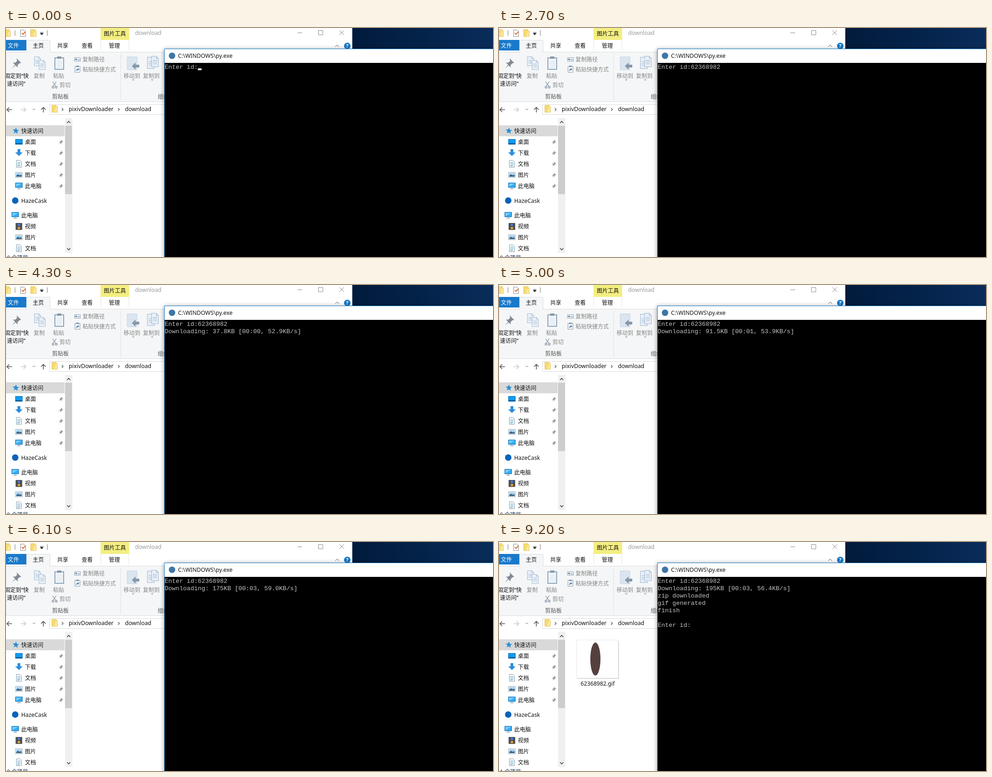
An HTML page for the animation above (9.3 s loop, 1056 px wide and 499 px high).

```html
<!DOCTYPE html>
<html lang="zh-CN">
<head>
<meta charset="utf-8">
<title>Downloader</title>
<style>
  html, body { margin: 0; width: 100%; height: 100%; overflow: hidden; background: #fff; }
  svg { display: block; width: 1056px; height: 499px; }
  text { font: 12px "Noto Sans", "Noto Sans CJK SC", "Noto Sans CJK JP", sans-serif; fill: #111; }
  .latin { font-size: 12.3px; }
  .dim text { fill: #858585; }
  #lines text { font: 13.333px "Liberation Mono", monospace; fill: #c4c4c4; white-space: pre; }
  .line { fill: none; stroke: #555; }
  .window { filter: drop-shadow(0 1px 5px rgba(0, 0, 0, .4)); }
</style>
</head>
<body>
<svg viewBox="0 0 1056 499">
  <defs>
    <linearGradient id="sky">
      <stop offset="0" stop-color="#021b3c"/>
      <stop offset=".5" stop-color="#04234a"/>
      <stop offset="1" stop-color="#0a2c5a"/>
    </linearGradient>
    <g id="folder"><path d="M0 1h10v3h3v13H0z" fill="#f6da72"/><path d="M10 4h3v13h-8z" fill="#fbe9a2"/><path d="M.5 1.5h9.500v3h2.500v12H.5z" fill="none" stroke="#e5c456"/></g>
    <path id="pin" d="M5 0l5 5-2 .5-2 2 .2 2.500-2.400-2.300L0 11l3.300-4L1 4.600l2.600.2 2-2z"/>
    <path id="chevron" d="M-2-3l3 3-3 3" fill="none" stroke="#555" stroke-width="1.300"/>
    <path id="arrow" d="M12 0H1M6-5L1 0l5 5" fill="none" stroke-width="1.600"/>
    <g id="page"><path d="M.5.5h9l4 4v15H.5z" fill="#e9f0f8" stroke="#a9bdd2"/><path d="M9.500.5v4h4M3 8h8M3 11h8M3 14h8" fill="none" stroke="#a9bdd2"/></g>
    <g id="monitor"><path d="M.5 1.500h15v10H.5z" fill="#35aaf0" stroke="#1b78b4"/><path d="M2 3h12L2 10z" fill="#7accfa"/><path d="M4 14.500h8M8 12v2" stroke="#71889a"/></g>
    <g id="doc"><path d="M2.500.5h8l3 3v12h-11z" fill="#fff" stroke="#8796a3"/><path d="M4.500 5h7M4.500 8h7M4.500 11h7M4.500 13h5" stroke="#3b9bc4"/></g>
    <g id="photo"><path d="M.5 2.500h15v11H.5z" fill="#fff" stroke="#9aa4ac"/><path d="M2 4h12v8H2z" fill="#9fd1f3"/><path d="M2 10l4-3 3 2 5-1v4H2z" fill="#356487"/></g>
  </defs>

  <rect width="1056" height="499" fill="#fff"/>
  <rect x="751" width="305" height="46" fill="url(#sky)"/>
  <path d="M750.500 0v45" stroke="#d5dce2"/>

  <!-- title bar -->
  <use href="#folder" x="-3" y="2"/>
  <path d="M19.500 5v12M89.500 5v12" stroke="#777"/>
  <path d="M31.500 4.500h8l3 3v11h-11z" fill="#fff" stroke="#888"/>
  <path d="M34 11l3 3 5-6" fill="none" stroke="#e0713a" stroke-width="2"/>
  <use href="#folder" x="53" y="2"/>
  <path d="M74 9.500h7M74 11.500h7l-3.500 3.500z" fill="#111" stroke="#111" stroke-width=".7"/>
  <rect x="205" width="62" height="26" fill="#f3ee80"/>
  <path d="M205.500 26v22M266.500 26v22" stroke="#e3e3e3"/>
  <text x="212" y="17">图片工具</text>
  <text class="latin" x="280" y="15" style="fill:#999">download</text>
  <path class="line" d="M632 10.500h10M677.500 5.500h9.500v9.500h-9.500zM723 5l10 10M733 5l-10 10" style="stroke:#888"/>
  <path class="line" d="M714 41l4-4 4 4"/>
  <circle cx="740" cy="39" r="7" fill="#1377c8"/>
  <text x="737.300" y="43" style="fill:#fff;font-size:11px;font-weight:bold">?</text>

  <!-- ribbon -->
  <path d="M0 52.500h344v108H0z" fill="#f5f6f7" stroke="#dadbdc"/>
  <rect y="26" width="44" height="23" fill="#1979ca"/>
  <path d="M44.500 53V26.500h51V53" fill="#f5f6f7" stroke="#dadbdc"/>
  <text x="4" y="42.500" style="fill:#fff">文件</text>
  <text x="58" y="42.500">主页</text>
  <text x="111" y="42.500">共享</text>
  <text x="164" y="42.500">查看</text>
  <text x="223" y="42.500">管理</text>
  <path d="M248.500 56v101" stroke="#e0e1e2"/>
  <use href="#pin" transform="translate(13 66) scale(2)" fill="#818b94"/>
  <use href="#page" transform="translate(61 62) scale(1.050)"/>
  <use href="#page" transform="translate(71 70) scale(1.050)"/>
  <path d="M106 65h19v25h-19z" fill="#f1f5f9" stroke="#8ba3b9" stroke-width="2"/>
  <path d="M111 62h9v5h-9z" fill="#8d99a5"/>
  <path d="M109 73h13M109 77h13M109 81h13M109 85h13" stroke="#d4dde6"/>
  <g class="line" style="stroke:#7d8fa1" stroke-width="1.300"><path d="M101 117l7 10M109 117l-7 10"/><circle cx="102" cy="129" r="2"/><circle cx="109" cy="129" r="2"/></g>
  <path d="M148.500 64.500h13v8h-13z" fill="#e6edf4" stroke="#9aabba"/>
  <path d="M150 67l1 3 1-3 1 3 1-3M156 69.500h4" class="line" style="stroke:#667f95"/>
  <path d="M149.500 83.500h11v13h-11z" fill="#f5f8fb" stroke="#8299ad"/>
  <path d="M152 82h6v3h-6z" fill="#8299ad"/>
  <path d="M152 94c0-4 2-5 4-5v-2l3 3-3 3v-2" fill="#5c84ab"/>
  <path d="M263 63h21v28h-21z" fill="#dae5f0" stroke="#c1d1e1"/>
  <path d="M289 80h-8v-5l-8 8 8 8v-5h8z" fill="#8798aa"/>
  <use href="#page" transform="translate(306 63) scale(1.150 1.300)"/>
  <use href="#page" transform="translate(315 61) scale(1.150 1.200)"/>
  <path d="M273 112h6l-3 3zM314 112h6l-3 3z" fill="#aaa"/>
  <text x="-3" y="108.500">固定到“快</text>
  <text x="2" y="125.500">速访问”</text>
  <g class="dim">
    <text x="60" y="108.500">复制</text>
    <text x="102" y="108.500">粘贴</text>
    <text x="116" y="128.500">剪切</text>
    <text x="166" y="72.500">复制路径</text>
    <text x="166" y="94.500">粘贴快捷方式</text>
    <text x="255" y="108.500">移动到</text>
    <text x="297" y="108.500">复制到</text>
  </g>
  <text x="100" y="153.500" style="fill:#555">剪贴板</text>
  <text x="329" y="153.500" style="fill:#555">组织</text>

  <!-- address bar -->
  <use href="#arrow" x="1" y="178" stroke="#555"/>
  <use href="#arrow" transform="translate(44 178) scale(-1 1)" stroke="#ccc"/>
  <path class="line" d="M58 176l2.500 2.500 2.500-2.500"/>
  <use href="#arrow" transform="translate(81 184) rotate(90) translate(-12 0)" stroke="#555"/>
  <path d="M350 166.500H94.500v22H350" fill="#fff" stroke="#d9d9d9"/>
  <use href="#folder" x="99" y="167"/>
  <use href="#chevron" x="123" y="177.500"/>
  <use href="#chevron" x="245" y="177.500"/>
  <text class="latin" x="136" y="181">pixivDownloader</text>
  <text class="latin" x="258" y="181">download</text>

  <!-- navigation pane -->
  <rect x="128" y="196" width="16" height="294" fill="#f0f0f0"/>
  <rect x="128" y="213" width="15" height="149" fill="#cdcdcd"/>
  <path d="M132.500 207l3.500-3.500 3.500 3.500M132.500 480l3.500 3.500 3.500-3.500" fill="none" stroke="#444" stroke-width="1.600"/>
  <rect y="212" width="127" height="24" fill="#d9d9d9"/>
  <path d="M22 217l1.500 5 5 .5-4 3 1 5-4.500-3-4.500 2 2-4.500-4-3.500 5-.5z" fill="#2a8fd6"/>
  <path d="M20.500 242.500h15v11h-15z" fill="#129af0" stroke="#0c70b4"/>
  <path d="M21 252h14" stroke="#0b5b94" stroke-width="2"/>
  <path d="M25 264h6v7h5l-8 8-8-8h5z" fill="#2c8ddd"/>
  <use href="#doc" x="20" y="288"/>
  <use href="#photo" x="20" y="312"/>
  <use href="#monitor" x="20" y="336"/>
  <circle cx="20" cy="376" r="7" fill="#0b63b8"/>
  <use href="#monitor" x="12" y="400"/>
  <path d="M21 425h14v15H21z" fill="#222"/>
  <path d="M25 426h6v6h-6z" fill="#4b78c9"/><path d="M25 433h6v6h-6z" fill="#c39a4e"/>
  <path d="M23 426v14M33 426v14" stroke="#ddd" stroke-width="1.500" stroke-dasharray="1.500"/>
  <use href="#photo" x="20" y="448"/>
  <use href="#doc" x="20" y="472"/>
  <g fill="#8d989f">
    <use href="#pin" x="114" y="243"/><use href="#pin" x="114" y="267"/><use href="#pin" x="114" y="291"/>
    <use href="#pin" x="114" y="315"/><use href="#pin" x="114" y="339"/>
  </g>
  <text x="33" y="228.500">快速访问</text>
  <text x="41" y="252.500">桌面</text>
  <text x="41" y="276.500">下载</text>
  <text x="41" y="300.500">文档</text>
  <text x="41" y="324.500">图片</text>
  <text x="41" y="348.500">此电脑</text>
  <text class="latin" x="33" y="380.500">HazeCask</text>
  <text x="33" y="412.500">此电脑</text>
  <text x="41" y="436.500">视频</text>
  <text x="41" y="460.500">图片</text>
  <text x="41" y="484.500">文档</text>
  <text id="status" x="2" y="504.500" style="fill:#1e395b"></text>

  <!-- downloaded file -->
  <g id="file">
    <g id="icon">
      <path d="M183.500 210.500h44l18 18v65h-62z" fill="#f7f7f7" stroke="#d8d8d8"/>
      <path d="M227.500 210.500v18h18z" fill="#e3e3e3" stroke="#d0d0d0"/>
      <path d="M191 231h46v48h-46z" fill="#0078d7"/>
      <path d="M194 237h40v39h-40z" fill="#fff"/>
      <path d="M194 261l15-18 17 22 3-4-5-6 3-4 7 8v17h-40z" fill="#0078d7"/>
    </g>
    <g id="thumb">
      <path d="M170 216h90v82h-90z" fill="#ccc"/>
      <path d="M168.500 213.500h90v83h-90z" fill="#fff" stroke="#e6e6e6"/>
      <ellipse cx="209" cy="255" rx="11" ry="36" fill="#54403f"/>
    </g>
    <text x="177" y="313" style="font-size:12.200px">62368982.gif</text>
  </g>

  <!-- console -->
  <path class="window" d="M343.500 510V45.500H1070V510" fill="#fff" stroke="#1a7fc9"/>
  <rect x="344" y="76" width="712" height="423" fill="#000"/>
  <circle cx="360" cy="60.500" r="7" fill="#3d76a8"/>
  <text class="latin" x="373" y="65">C:\WINDOWS\py.exe</text>
  <g id="lines"></g>
  <rect id="cursor" width="8" height="4" fill="#fff"/>
</svg>
<script>
const LOOP = 9300, LEFT = 344, TOP = 76, ROW = 16, COL = 8;
const $ = id => document.getElementById(id);
const show = (id, on) => $(id).style.display = on ? '' : 'none';

// start, end, column, row of each visible cursor blink
const blinks = [
  [0, 200, 9, 0], [600, 900, 9, 0],
  [1600, 2000, 17, 0], [2400, 2700, 17, 0], [3100, 3500, 17, 0],
  [7000, 7400, 0, 3], [8100, 8500, 9, 6], [8800, 9200, 9, 6]
];

// time, kilobytes, elapsed seconds, rate
const progress = [
  [3800, 0, 0, 52], [4300, 37.8, .72, 52.9], [5000, 91.5, 1.7, 53.9],
  [6100, 175, 3.05, 59], [6400, 195, 3.48, 56.4]
];

const lines = Array.from({ length: 7 }, (_, row) => {
  const line = document.createElementNS('http://www.w3.org/2000/svg', 'text');
  line.setAttribute('x', LEFT);
  line.setAttribute('y', TOP + row * ROW + 13);
  return $('lines').appendChild(line);
});

function size(kb) {
  return kb.toFixed(kb < 9.995 ? 2 : kb < 99.95 ? 1 : 0) + 'KB';
}

function download(t) {
  if (t < 3800) return '';
  if (t < 3900) return 'Downloading: 0.00B [00:00, ?B/s]';
  const now = Math.min(Math.floor(t / 100) * 100, 6400);
  const next = progress.findIndex(p => p[0] >= now);
  const a = progress[next - 1], b = progress[next];
  const k = (now - a[0]) / (b[0] - a[0]);
  const [, kb, sec, rate] = a.map((v, i) => v + (b[i] - v) * k);
  return `Downloading: ${size(kb)} [00:0${Math.floor(sec)}, ${size(rate)}/s]`;
}

function draw() {
  const t = performance.now() % LOOP;
  const done = t >= 7500;
  const content = [
    'Enter id:' + (t >= 900 ? '62368982' : ''),
    download(t),
    t >= 6400 ? 'zip downloaded' : '',
    ...(done ? ['gif generated', 'finish', '', 'Enter id:'] : ['', '', '', ''])
  ];
  lines.forEach((line, i) => {
    if (line.textContent !== content[i]) line.textContent = content[i];
  });

  const blink = blinks.find(([from, to]) => t >= from && t < to);
  show('cursor', blink);
  if (blink) {
    $('cursor').setAttribute('x', LEFT + blink[2] * COL);
    $('cursor').setAttribute('y', TOP + blink[3] * ROW + 12);
  }

  show('file', t >= 7100);
  show('icon', t < 7900);
  show('thumb', t >= 7900);
  $('status').textContent = (done ? 1 : 0) + ' 个项目';
  requestAnimationFrame(draw);
}
draw();
</script>
</body>
</html>
```
